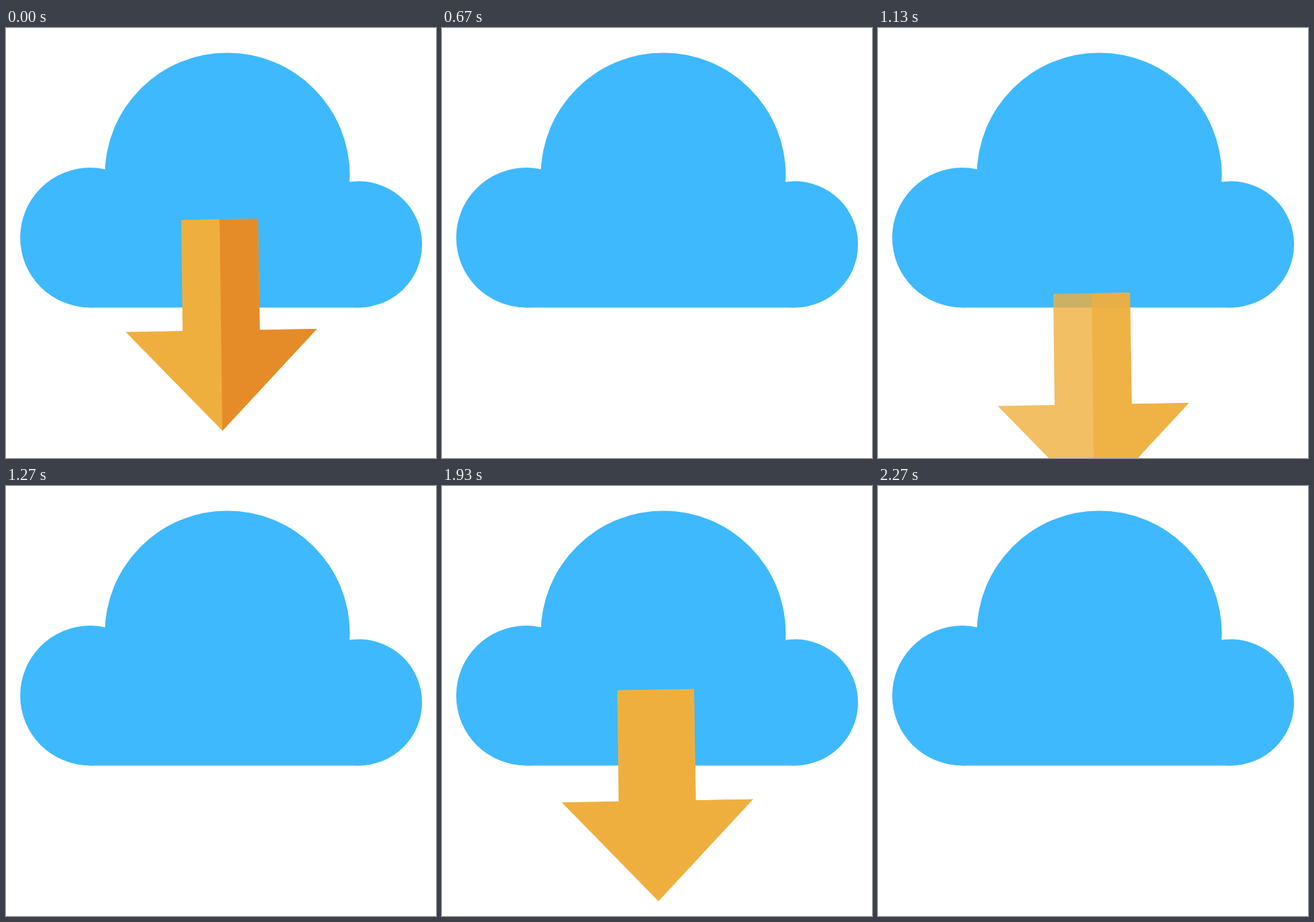
An HTML page for the animation above (2940 ms loop, 616 by 616 pixels).

```html
<!DOCTYPE html>
<html lang="en">
<head>
<meta charset="utf-8">
<title>Cloud download</title>
<style>
  html, body { margin: 0; width: 100%; height: 100%; overflow: hidden; background: #fff; }
  svg { display: block; width: 100%; height: 100%; }
</style>
</head>
<body>
<svg viewBox="0 0 616 616">
  <g fill="#3eb9fd">
    <circle cx="317" cy="211" r="175.5"/>
    <circle cx="120.5" cy="300.3" r="100.2"/>
    <circle cx="505.5" cy="310" r="90.5"/>
    <rect x="120" y="300" width="386" height="100.5"/>
  </g>
  <g id="arrow">
    <path id="body" fill="#efaf3e" d="M251 275 L361 273 L363.5 432.5 L445.5 431 L310 577 L171.5 435.5 L253 434 Z"/>
    <path id="shade" d="M306 274 L361 273 L363.5 432.5 L445.5 431 L310 577 Z"/>
  </g>
</svg>
<script>
  const LOOP = 2940;
  const TICK = 1000 / 15;
  const CYCLE = 14;  // ticks per drop
  const LEAD = 2;    // ticks the arrow shows before it falls
  const DROPS = 3;

  const [arrow, body, shade] = ['arrow', 'body', 'shade'].map(id => document.getElementById(id));
  const clamp = x => Math.min(1, Math.max(0, x));

  function draw(time) {
    const tick = Math.floor((time % LOOP + 4) / TICK);
    const drop = Math.floor((tick + LEAD) / CYCLE);
    const n = tick - drop * CYCLE;

    const y = n > 0 ? 8.83 * n * (n + 1) : 0;
    const fadeIn = clamp((n + 3) / 2);
    const fadeOut = clamp((5 - n) / 2.5);
    const alpha = drop < DROPS ? Math.min(fadeIn, fadeOut) : 0;

    arrow.setAttribute('transform', `translate(0 ${y})`);
    body.setAttribute('opacity', alpha);
    shade.setAttribute('opacity', alpha);
    shade.setAttribute('fill', drop === 0 ? '#e58c28' : '#efaf3e');
  }

  const start = performance.now();
  function run() {
    draw(performance.now() - start);
    requestAnimationFrame(run);
  }
  run();
</script>
</body>
</html>
```
